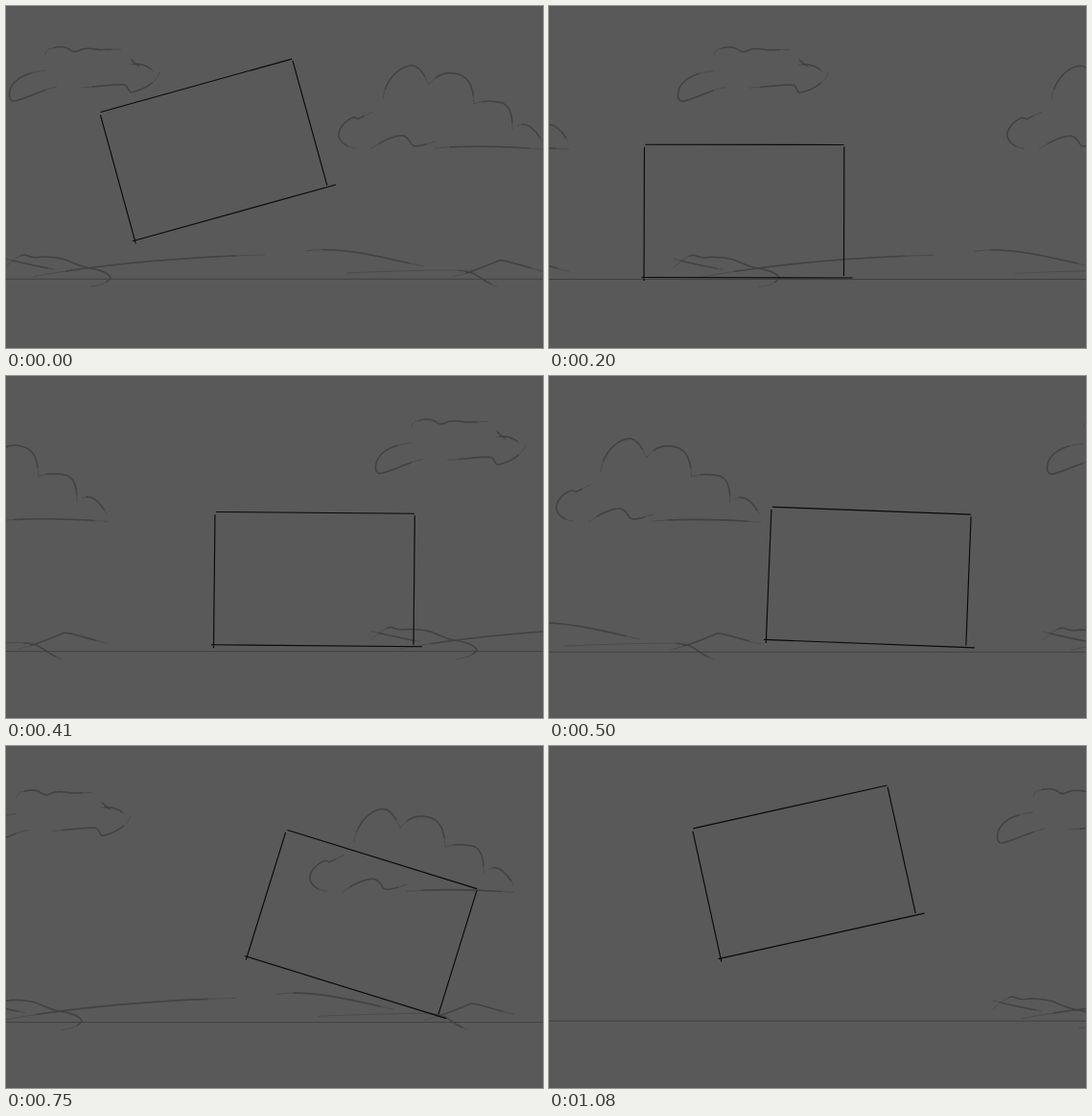
These frames come from a looping animation (560x356 px, 1.16 s). An HTML page:

```html
<!DOCTYPE html>
<html lang="en">
<head>
<meta charset="utf-8">
<title>Hopping box</title>
<style>
html, body { margin: 0; height: 100%; overflow: hidden; background: #595959; }
svg { display: block; width: 100%; height: 100%; }
path { fill: none; stroke: #404040; }
.thin { stroke-width: .9; opacity: .6; }
.core { stroke-width: 1.6; opacity: .8; stroke-dasharray: 0 .14 .74 1; }
.faint { stroke-width: .9; opacity: .6; }
#box path { stroke: #0a0a0a; stroke-width: 1.15; }
</style>
</head>
<body>
<svg viewBox="0 0 560 356">
  <defs><g id="land"></g></defs>
  <g id="view">
    <path d="M0 284.2H560" stroke-width="1"/>
    <use id="first" href="#land"/>
    <use id="second" href="#land"/>
  </g>
  <g id="box">
    <path d="M-103-69.3L104-69M104.3-67L104 67.5M-107 69L113 69.5M-104-66.5L-104.5 72.5"/>
  </g>
</svg>
<script>
const $ = id => document.getElementById(id);

const strokes = [
  // small cloud
  'M41 51C42 46 45 44 48 44C55 42 62 42 66 45C70 49 74 48 79 45C86 43 92 45 98 45.5L120 45',
  'M129 54C132 58 136 61 140 63.5',
  'M129 61C140 59 148 62 154 68',
  'M160 69C158 77 148 86 131 90C127 90 129 85 124 82C112 81 98 84 78 85',
  'M41 67C25 69 11 73 5 85C3 91 2 98 8 99C18 98 35 88 53 84',
  // large cloud
  'M393 97C395 78 410 62 424 62C432 63 437 73 441 82',
  'M441 82C450 70 459 69 467 70C484 72 487 85 488 102',
  'M488 102C496 98 510 99 518 101C527 106 528 115 528 129',
  'M533 125C540 121 549 123 559 141',
  'M383 110L367 117.5C364 115 362 116 360 117C351 121 346 130 347 136C350 144 357 147 365 148',
  'M380 149C389 143 400 136 411 135C419 134 421 142 424 145C430 148 439 143 448 141',
  'M447 148C480 145 520 146 560 149',
  // ground
  'M-1 272C6 266 13 259 20 259C26 262 33 262 37 261C50 261 55 262 62 264C73 269 80 272 88 273C100 275 108 279 109 283C105 289 97 291 88 292',
  'M-1 263C15 267 32 271 50 274',
  'M28 282C55 276 150 262 270 259',
  'M312 255C350 250 385 260 435 271',
  'M466 282C485 277 500 271 514 265C520 264 525 267 560 276',
  'M465 275C495 275 489 284 512 292'
];
const line = (d, cls) => `<path class="${cls}" pathLength="1" d="${d}"/>`;
$('land').innerHTML = strokes.map(d => line(d, 'thin') + line(d, 'core')).join('') +
  line('M355 278C400 276 440 275 465 275', 'faint');

// Monotone cubic curve through [step, value] keys
function curve(...keys) {
  const n = keys.length - 1;
  const rate = i => (keys[i + 1][1] - keys[i][1]) / (keys[i + 1][0] - keys[i][0]);
  const slope = keys.map((_, i) => {
    if (i === 0) return rate(0);
    if (i === n) return rate(n - 1);
    const a = rate(i - 1), b = rate(i);
    return a * b > 0 ? 2 * a * b / (a + b) : 0;
  });
  return k => {
    let i = 0;
    while (i < n - 1 && k > keys[i + 1][0]) i++;
    const [k0, v0] = keys[i], [k1, v1] = keys[i + 1];
    const h = k1 - k0, u = (k - k0) / h, w = 1 - u;
    return v0 * w * w * (1 + 2 * u) + v1 * u * u * (3 - 2 * u) +
      h * u * w * (slope[i] * w - slope[i + 1] * u);
  };
}

const boxX = curve([0, 216.5], [5, 203.5], [10, 321.5], [15, 346.8], [18, 371.5], [21, 336.5], [26, 266]);
const boxY = curve([0, 149.5], [5, 213.5], [10, 211.5], [15, 203], [18, 184], [21, 157], [26, 131]);
const tilt = curve([0, -15.6], [5, 0], [10, .4], [15, 7.6], [18, 17.1], [21, 24.5], [26, -12.6]);
const lift = curve([0, 0], [5, .3], [10, 2.5], [15, 3.7], [18, 3.4], [21, 3], [26, 2]);
const secondX = curve([0, -560], [5, -539], [10, -454], [15, -125], [18, -30], [21, 122], [26, 464]);
const firstX = k => 14.2 * k + 2.4 * k * k;

const move = (id, x, y, turn = 0) =>
  $(id).setAttribute('transform', `translate(${x} ${y}) rotate(${turn})`);

function draw(now) {
  // 24 steps per second, on a 10 ms clock; the last step is held
  const ticks = Math.floor(now % 1160 / 10);
  const k = Math.min(26, Math.ceil((ticks + 1) * 6 / 25) - 1);
  move('view', 0, lift(k));
  move('first', firstX(k), 0);
  move('second', secondX(k), 0);
  move('box', boxX(k), boxY(k), tilt(k));
}

const start = performance.now();
function loop() {
  draw(performance.now() - start);
  requestAnimationFrame(loop);
}
loop();
</script>
</body>
</html>
```
